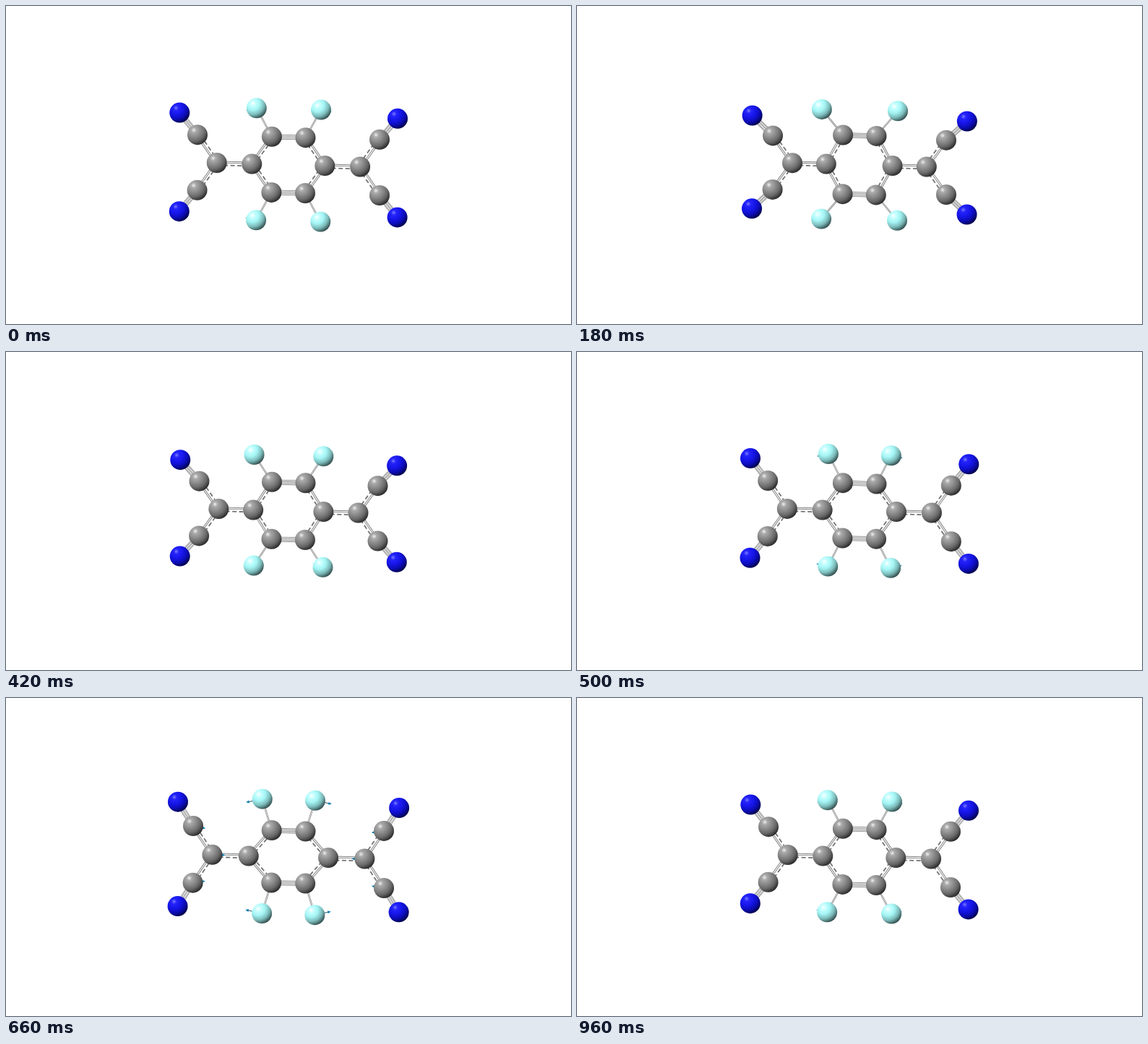
These frames come from a looping animation (782x440 px, 980 ms). An HTML page with a canvas:

```html
<!DOCTYPE html>
<html lang="en">
<head>
<meta charset="utf-8">
<title>Molecular vibration</title>
<style>
  html, body { margin: 0; width: 100%; height: 100%; overflow: hidden; background: #fff; }
  canvas { display: block; }
</style>
</head>
<body>
<canvas id="stage" width="782" height="440"></canvas>
<script>
const ctx = document.getElementById('stage').getContext('2d');
const LOOP = 980, PERIOD = 960, STEP = 20, RADIUS = 14, ARROW = 1.65;

// Equilibrium x, y and vibration amplitude dx, dy
const atoms = {
  N1: [240.3, 147.6, 2.5, 4.2],  N2: [239.8, 284.2, 2.4, -4.2],
  N3: [542, 155.8, -2.3, 4],     N4: [541.6, 292.4, -2.2, -4.2],
  C1: [265, 178.2, 6.5, 1.3],    C2: [264.6, 254.8, 6.5, -.9],
  C3: [517, 184.8, -6.5, .9],    C4: [517, 262, -6.5, -1.1],
  CL: [291.7, 217, 6.8, .2],     CR: [490.1, 222.5, -6.8, 0],
  L: [340.3, 218.6, 4.9, 0],     R: [441.3, 221.1, -5.1, 0],
  TL: [367.9, 180.8, .2, -2.5],  TR: [414.5, 182.2, 0, -2.5],
  BL: [367.4, 257.9, .2, 2.5],   BR: [414, 259, -.2, 2.6],
  F1: [346.8, 141.3, -8.6, 1.8], F2: [436, 143.6, 8.7, 1.9],
  F3: [346.1, 296.3, -8.7, -1.9], F4: [435.2, 298.5, 8.5, -1.8]
};

// Dashed strands lie to the right of the bond's direction
const bonds = {
  single: ['F1 TL', 'F2 TR', 'F3 BL', 'F4 BR'],
  partial: ['CL L', 'R CR', 'L TL', 'BL L', 'TR R', 'R BR', 'CL C1', 'C2 CL', 'C3 CR', 'CR C4'],
  double: ['TL TR', 'BL BR'],
  triple: ['N1 C1', 'N2 C2', 'N3 C3', 'N4 C4']
};

// Offset, width and dash of each strand
const strands = {
  single: [[0, 2.2]],
  partial: [[-1.3, 3], [3, 1.8, [6, 3.5]]],
  double: [[-2, 2.8], [2, 2.8]],
  triple: [[-3, 1.8], [0, 1.8], [3, 1.8]]
};

// Tones from the lit spot to the far rim
const tones = {
  C: ['#f0f0f0', '#aaa', '#8c8c8c', '#686868', '#242424'],
  N: ['#7c7cff', '#2424fa', '#1616ea', '#0c0cb4', '#000040'],
  F: ['#fff', '#c8ffff', '#a4f4f4', '#7cbaba', '#2c4444']
};
const stops = [0, .16, .42, .7, 1];

function line(x1, y1, x2, y2, color, width, dash = []) {
  ctx.strokeStyle = color;
  ctx.lineWidth = width;
  ctx.setLineDash(dash);
  ctx.beginPath();
  ctx.moveTo(x1, y1);
  ctx.lineTo(x2, y2);
  ctx.stroke();
}

function drawBond([ax, ay], [bx, by], kind) {
  const len = Math.hypot(bx - ax, by - ay);
  const nx = (ay - by) / len, ny = (bx - ax) / len;
  for (const [off, width, dash] of strands[kind]) {
    const ends = [ax + nx * off, ay + ny * off, bx + nx * off, by + ny * off];
    line(...ends, '#747474', width, dash);
    if (!dash) line(...ends, '#f4f4f4', width * .45);
  }
}

function drawArrow([x, y, dx, dy]) {
  const angle = Math.atan2(dy, dx), length = Math.hypot(dx, dy) * ARROW;
  ctx.save();
  ctx.translate(x, y);
  ctx.rotate(angle);
  line(0, 0, length - 3, 0, '#285c74', 1);
  ctx.fillStyle = '#087cac';
  ctx.beginPath();
  ctx.moveTo(length + .5, 0);
  ctx.lineTo(length - 4, -2);
  ctx.lineTo(length - 4, 2);
  ctx.fill();
  ctx.restore();
}

// Lit from the upper left, with the far rim in shadow
function drawBall([x, y], colors) {
  const lightX = x - 5, lightY = y - 6.5;
  const reach = RADIUS + Math.hypot(5, 6.5);
  const fill = ctx.createRadialGradient(lightX, lightY, 0, lightX, lightY, reach);
  stops.forEach((stop, i) => fill.addColorStop(stop, colors[i]));
  ctx.fillStyle = fill;
  ctx.beginPath();
  ctx.arc(x, y, RADIUS, 0, Math.PI * 2);
  ctx.fill();
}

function draw(now) {
  const time = Math.floor(now % LOOP / STEP) * STEP;
  const swing = Math.sin(time / PERIOD * Math.PI * 2);
  const pos = {};
  for (const [id, [x, y, dx, dy]] of Object.entries(atoms)) {
    pos[id] = [x + dx * swing, y + dy * swing];
  }

  ctx.fillStyle = '#fff';
  ctx.fillRect(0, 0, 782, 440);
  for (const kind in bonds) {
    for (const pair of bonds[kind]) {
      const [a, b] = pair.split(' ');
      drawBond(pos[a], pos[b], kind);
    }
  }
  Object.values(atoms).forEach(drawArrow);
  for (const id in pos) drawBall(pos[id], tones[id[0]] || tones.C);
  requestAnimationFrame(draw);
}

requestAnimationFrame(draw);
</script>
</body>
</html>
```
